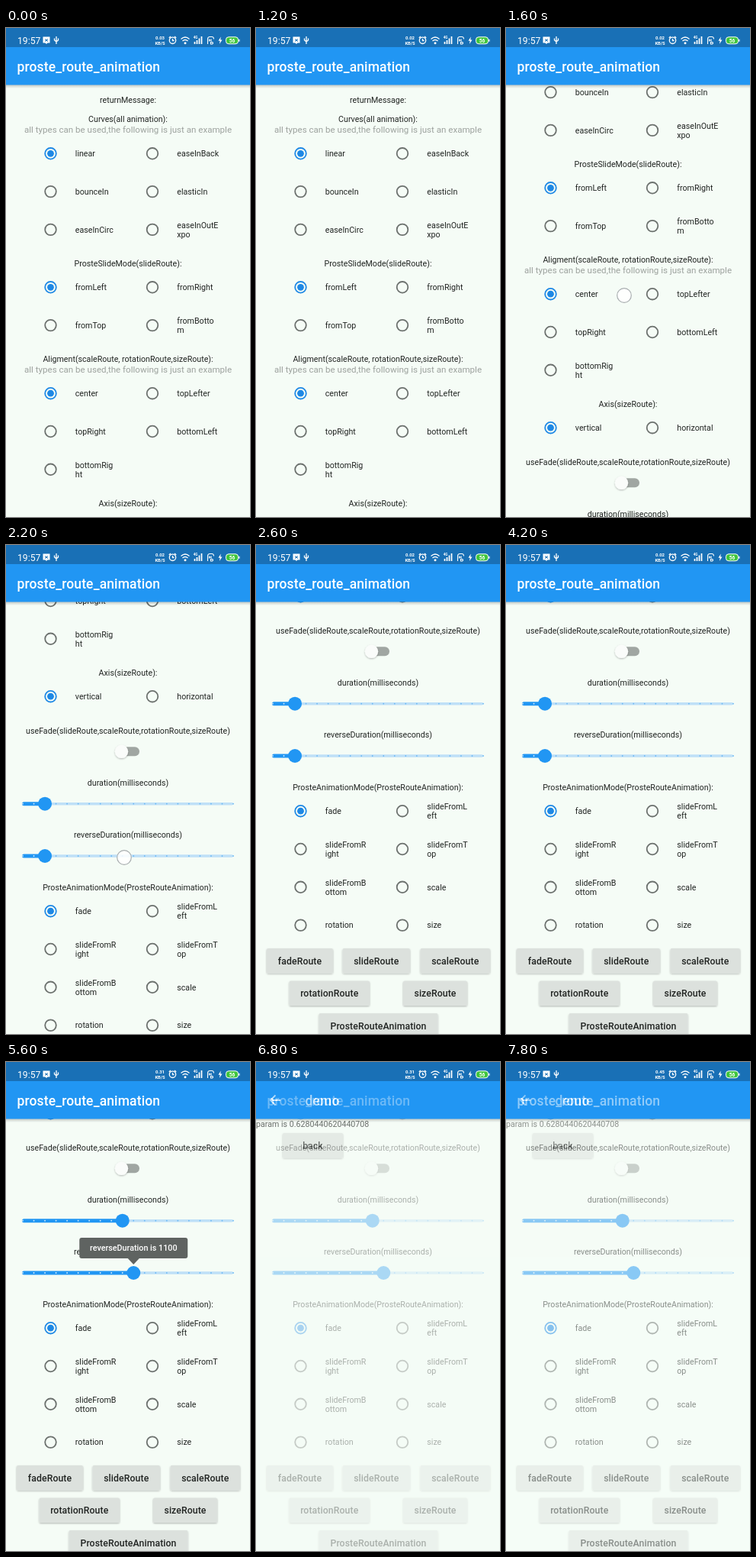
These frames come from a looping animation (320 px wide and 640 px high, 8000 ms). An HTML page:

```html
<!DOCTYPE html>
<html lang="en">
<head>
<meta charset="utf-8">
<title>Route animation demo</title>
<style>
  html, body { margin: 0; width: 100%; height: 100%; overflow: hidden; background: #f5fcf6; }
  svg { display: block; width: 100%; height: 100%; }
  text { font-family: Roboto, sans-serif; font-size: 10.66px; fill: #212422; white-space: pre; }
  .mid { text-anchor: middle; }
  .note { font-size: 11.58px; fill: #9da29e; }
  .title { font-size: 17.5px; font-weight: 500; letter-spacing: .13px; fill: #fff; }
  .btn { font-size: 12.25px; font-weight: 500; letter-spacing: .1px; }
  .tip { font-size: 10.75px; font-weight: 500; fill: #fff; }
  .status text { fill: #fff; }
  .icon { fill: none; stroke: #fff; stroke-width: 1.3; }
</style>
</head>
<body>
<svg id="stage" viewBox="0 0 320 640">
  <defs>
    <linearGradient id="shade" x2="0" y2="1">
      <stop stop-color="#000" stop-opacity=".22"/>
      <stop offset="1" stop-color="#000" stop-opacity="0"/>
    </linearGradient>
    <filter id="lift" x="-20%" y="-30%" width="140%" height="170%">
      <feDropShadow dx="0" dy="1" stdDeviation="1" flood-opacity=".28"/>
    </filter>
  </defs>
</svg>
<script>
const LOOP = 8000, STEP = 200;
const BLUE = '#2196f3', PAPER = '#f5fcf6';
const TRACK_X = 22, TRACK_W = 276, DIVISIONS = 19;

const stage = document.getElementById('stage');
const $ = id => document.getElementById(id);
const clamp = (v, a = 0, b = 1) => Math.min(b, Math.max(a, v));
const ramp = (t, start, length) => clamp((t - start) / length);
const within = (t, a, b) => t >= a && t < b;

// Piecewise linear track through [time, value] points.
function follow(t, points) {
  let [t0, v0] = points[0];
  if (t <= t0) return v0;
  for (const [t1, v1] of points) {
    if (t < t1) return v0 + (v1 - v0) * (t - t0) / (t1 - t0);
    [t0, v0] = [t1, v1];
  }
  return v0;
}

const text = (x, y, s, cls = '', id = '') =>
  `<text x="${x}" y="${y}" class="${cls}" id="${id}">${s}</text>`;
const heading = (y, s) => text(160, y + 3.8, s, 'mid');
const note = y => text(160, y + 3.8, 'all types can be used,the following is just an example', 'mid note');

function radio(x, y, label, on) {
  const lines = label.split('|');
  const top = y + 3.8 - (lines.length - 1) * 6;
  return `<circle cx="${x}" cy="${y}" r="7.3" fill="none" stroke="${on ? '#1e88e5' : '#6c716e'}" stroke-width="1.8"/>` +
    (on ? `<circle cx="${x}" cy="${y}" r="4.4" fill="#1e88e5"/>` : '') +
    lines.map((s, i) => text(x + 32.3, top + i * 12, s)).join('');
}

// Two-column radio list; the first entry is selected.
const radios = (y, labels) => labels.map((label, i) =>
  radio(i % 2 ? 192 : 58.5, y + Math.floor(i / 2) * 49.8, label, i === 0)).join('');

const button = (x, y, w, label) =>
  `<rect x="${x}" y="${y}" width="${w}" height="32.5" rx="2" fill="#dce1dd" filter="url(#lift)"/>` +
  text(x + w / 2, y + 20.8, label, 'btn mid');

function slider(id, y) {
  let dots = '';
  for (let i = 0; i <= DIVISIONS; i++)
    dots += `<circle cx="${TRACK_X + i * TRACK_W / DIVISIONS}" cy="${y}" r=".9"/>`;
  return `<rect x="${TRACK_X}" y="${y - 1.75}" width="${TRACK_W}" height="3.5" rx="1.75" fill="#bfe0f7"/>
    <rect id="${id}Fill" x="${TRACK_X - 1}" y="${y - 2.5}" height="5" rx="2.5" fill="${BLUE}"/>
    <g id="${id}Dots" fill="#6db9f4">${dots}</g>
    <circle id="${id}Thumb" cy="${y}" r="9" fill="${BLUE}"/>`;
}

const appBar = (x, label) =>
  `<rect y="74" width="320" height="5" fill="url(#shade)"/>
   <rect width="320" height="74.5" fill="${BLUE}"/>` + text(x, 57, label, 'title');

const options = `<g id="list">
  ${heading(94, 'returnMessage:')}
  ${heading(119.5, 'Curves(all animation):')}${note(132.7)}
  ${radios(164.3, ['linear', 'easeInBack', 'bounceIn', 'elasticIn', 'easeInCirc', 'easeInOutE|xpo'])}
  ${heading(308, 'ProsteSlideMode(slideRoute):')}
  ${radios(339.3, ['fromLeft', 'fromRight', 'fromTop', 'fromBotto|m'])}
  ${heading(433.5, 'Aligment(scaleRoute, rotationRoute,sizeRoute):')}${note(446.7)}
  ${radios(478.2, ['center', 'topLefter', 'topRight', 'bottomLeft', 'bottomRig|ht'])}
  ${heading(622, 'Axis(sizeRoute):')}
  ${radios(653.2, ['vertical', 'horizontal'])}
  ${heading(697.7, 'useFade(slideRoute,scaleRoute,rotationRoute,sizeRoute)')}
  <rect x="146" y="719.3" width="29" height="12" rx="6" fill="#a0a6a2"/>
  <circle cx="151.5" cy="725.3" r="8.7" fill="#fafcfa" filter="url(#lift)"/>
  ${heading(766, 'duration(milliseconds)')}${slider('dur', 793.7)}
  ${heading(834.3, 'reverseDuration(milliseconds)')}${slider('rev', 862)}
  ${heading(903, 'ProsteAnimationMode(ProsteRouteAnimation):')}
  ${radios(934.2, ['fade', 'slideFromL|eft', 'slideFromR|ight', 'slideFromT|op', 'slideFromB|ottom', 'scale', 'rotation', 'size'])}
  ${button(14, 1114, 87, 'fadeRoute')}${button(113.5, 1114, 88.5, 'slideRoute')}${button(215.5, 1114, 91.5, 'scaleRoute')}
  ${button(43.5, 1156.5, 105.5, 'rotationRoute')}${button(193, 1156.5, 84, 'sizeRoute')}
  ${button(82.5, 1199, 156, 'ProsteRouteAnimation')}
  <g id="tip"><rect id="tipBox" y="-46" height="27" rx="3" fill="#5f6361"/>
    <path d="M-8-19.5H8L0-11z" fill="#5f6361"/>${text(0, -28.8, '', 'tip mid', 'tipText')}</g>
</g>`;

const demo = `<g id="demo">
  <rect width="320" height="640" fill="${PAPER}"/>
  ${text(0, 84.5, '', '', 'param')}
  <g id="back">${button(-39.5, 93, 79, 'back')}</g>
  ${appBar(64.5, 'demo')}
  <path d="M32 50H19.5M25.5 43.5 19 50l6.5 6.5" fill="none" stroke="#fff" stroke-width="1.8"/>
</g>`;

const status = `<g class="status">
  <rect width="320" height="25" fill="#1970b6"/>
  <text x="15" y="20.5" style="font-size:12.2px">19:57</text>
  <path d="M48.500 11.500h9v8h-3l-1.500 1.500-1.500-1.500h-3z" fill="#fff"/>
  <path d="M51 14.500l4 3m0-3l-4 3" stroke="#1970b6"/>
  <path class="icon" d="M66 11v10M63.500 13.500v2.500l2.500 2 2.500-2v-2.500" stroke-width="1"/>
  <g style="font-weight:700" class="mid">
    <text id="rate" x="202" y="15" style="font-size:6px"></text>
    <text x="202" y="21.500" style="font-size:5.800px">KB/S</text>
    <text x="248.500" y="14" style="font-size:4.500px">4G</text>
  </g>
  <g class="icon">
    <circle cx="218.500" cy="16.300" r="4.200"/>
    <path d="M218.500 14v2.500h2M213.800 13l2.200-2M223.200 13l-2.200-2"/>
    <path d="M229.500 14.500q5.500-5 11 0M231.500 17q3.500-3 7 0"/>
    <path d="M247.500 21v-3M250.500 21v-5M253.500 21v-7.500M256.500 21v-10" stroke-width="1.700"/>
    <path d="M264.500 21v-6.500q0-3 3-3h2.500q2.500 0 2.500 3M266.500 17.500v-3m0 1.500h2.500m0-1.500v3" stroke-width="1.100"/>
    <path d="M268.500 21v-2.500h2q2 1.200 0 2.500z" stroke-width="1.100"/>
  </g>
  <circle cx="235" cy="19.800" r="1.500" fill="#fff"/>
  <path d="M281.800 11.500l-3.300 5.200h2.200l-.8 4.300 3.600-5.500h-2.300z" fill="#fff"/>
  <rect x="288.500" y="11.800" width="16" height="9" rx="3.500" fill="#3fc63c" stroke="#fff"/>
  <rect x="305.300" y="14.800" width="1.200" height="3" fill="#fff"/>
  <text x="296.500" y="18.800" class="mid" style="font-size:6.500px;font-weight:700">56</text>
</g>`;

stage.insertAdjacentHTML('beforeend',
  `<rect width="320" height="640" fill="${PAPER}"/>${options}${appBar(14.5, 'proste_route_animation')}${demo}${status}
   <circle id="touch" r="9.3" fill="#fff" fill-opacity=".85" stroke="#a9aeb0" stroke-width="1.2"/>`);

const SCROLL = [[1350, 0], [1600, 130], [1800, 290], [2000, 365], [2200, 455], [2400, 560], [2550, 586]];
const DURATION = [[4350, 2], [4800, 9]];
const REVERSE = [[5000, 2], [5450, 10]];
const thumbX = n => TRACK_X + n * TRACK_W / DIVISIONS;

function setSlider(id, n) {
  const x = thumbX(n);
  $(id + 'Fill').setAttribute('width', x - TRACK_X + 1);
  $(id + 'Thumb').setAttribute('cx', x);
  [...$(id + 'Dots').children].forEach((dot, i) => dot.setAttribute('fill', i < n ? '#d5ecfc' : '#6db9f4'));
}

function setTip(t, dur, rev) {
  const onDur = within(t, 4350, 4950), onRev = within(t, 5000, 5950);
  $('tip').style.display = onDur || onRev ? '' : 'none';
  const n = onDur ? dur : rev, w = onDur ? 106 : 142, x = thumbX(n);
  const left = Math.max(10, x - w / 2);
  $('tip').setAttribute('transform', `translate(${x} ${onDur ? 793.7 : 862})`);
  $('tipBox').setAttribute('x', left - x);
  $('tipBox').setAttribute('width', w);
  $('tipText').setAttribute('x', left - x + w / 2);
  $('tipText').textContent = `${onDur ? 'duration' : 'reverseDuration'} is ${100 + n * 100}`;
}

function touchPoint(t, scroll) {
  if (within(t, 1380, 1700)) return [155, 480 - scroll];
  if (within(t, 2100, 2350)) return [155, 864 - scroll];
  if (within(t, 4350, 4850)) return [thumbX(follow(t, DURATION)), 208];
  if (within(t, 5000, 5500)) return [thumbX(follow(t, REVERSE)), 276];
  if (within(t, 2780, 2930) || within(t, 5990, 6150)) return [57, 545];
  if (within(t, 3780, 3900)) return [77, 109];
  if (within(t, 7180, 7240)) return [75, 109];
  return null;
}

function draw(t) {
  const scroll = follow(t, SCROLL);
  $('list').setAttribute('transform', `translate(0 ${-scroll})`);

  const dur = Math.round(follow(t, DURATION)), rev = Math.round(follow(t, REVERSE));
  setSlider('dur', dur);
  setSlider('rev', rev);
  setTip(t, dur, rev);

  const second = t > 5000;
  $('demo').setAttribute('opacity', second
    ? ramp(t, 6150, 1000) - ramp(t, 7240, 1100)
    : ramp(t, 2930, 300) - ramp(t, 3900, 300));
  $('param').textContent = 'param is ' + (second ? '0.6280440620440708' : '0.09630865222231699');
  $('back').setAttribute('transform', `translate(${second ? 74.5 : 77.5} 0)`);

  $('rate').textContent = t < 600 ? '0.03' : t < 4400 ? '0.02' : t < 7400 ? '0.31' : '0.45';

  const p = touchPoint(t, scroll);
  $('touch').style.display = p ? '' : 'none';
  if (p) $('touch').setAttribute('transform', `translate(${p[0]} ${p[1]})`);
}

const begin = performance.now();
function tick() {
  const t = (performance.now() - begin) % LOOP;
  draw(Math.floor(t / STEP) * STEP);
  requestAnimationFrame(tick);
}
tick();
</script>
</body>
</html>
```
